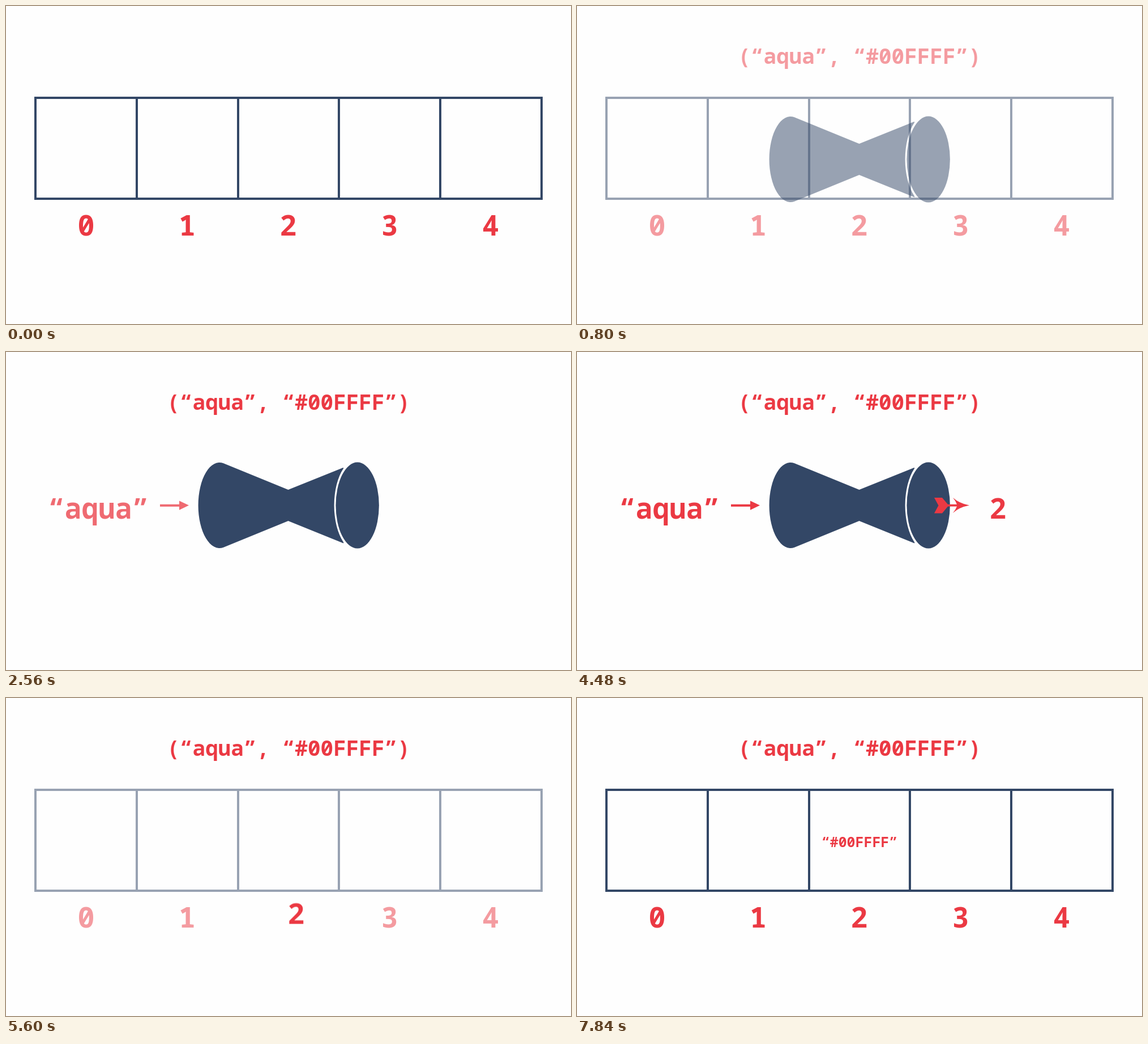
Recreate the animation shown at these times as an HTML page. Size 998 by 561 pixels, loop 8 s.

```html
<!DOCTYPE html>
<html lang="en">
<head>
<meta charset="utf-8">
<title>Hash function and buckets</title>
<style>
  :root { --navy: #334766; --red: #eb3943; }
  html, body { margin: 0; width: 100%; height: 100%; overflow: hidden; background: #fefefe; }
  svg { display: block; width: 100%; height: 100%; }
  text { font: 700 50px "Noto Sans Mono", "DejaVu Sans Mono", monospace; text-anchor: middle; fill: var(--red); }
  .title { font-size: 37.7px; }
  .key { font-size: 49.5px; }
  .value { font-size: 24.9px; }
  .lines { fill: none; stroke: var(--navy); stroke-width: 4; }
  .funnel { fill: var(--navy); }
  .arrow { fill: var(--red); }

  /* Every fade takes four 160 ms ticks. */
  .grid, .title, .funnel, .input, .output, .two, .value {
    animation: 8s steps(4, jump-start) infinite;
  }
  .grid { animation-name: grid; }
  .title { animation-name: title; }
  .funnel { animation-name: funnel; }
  .input { animation-name: input; }
  .output { animation-name: output; }
  .value { animation-name: value; }
  .two {
    animation-name: two, travel;
    animation-timing-function: steps(4, jump-start), step-end;
  }

  @keyframes grid { 0%, 8% { opacity: 1 } 16%, 68% { opacity: 0 } 76%, 100% { opacity: 1 } }
  @keyframes title { 0%, 8% { opacity: 0 } 16%, 100% { opacity: 1 } }
  @keyframes funnel { 0%, 8% { opacity: 0 } 16%, 64% { opacity: 1 } 72%, 100% { opacity: 0 } }
  @keyframes input { 0%, 28% { opacity: 0 } 36%, 64% { opacity: 1 } 72%, 100% { opacity: 0 } }
  @keyframes output { 0%, 50% { opacity: 0 } 58%, 64% { opacity: 1 } 72%, 100% { opacity: 0 } }
  @keyframes value { 0%, 80% { opacity: 0 } 88%, 100% { opacity: 1 } }
  @keyframes two { 0%, 8% { opacity: 1 } 16%, 50% { opacity: 0 } 58%, 100% { opacity: 1 } }
  @keyframes travel {
    0% { transform: translate(0, 0) }
    40% { transform: translate(245px, -111px) }
    64% { transform: translate(231px, -104.5px) }
    66% { transform: translate(167px, -75.5px) }
    68% { transform: translate(78px, -35.5px) }
    70% { transform: translate(14px, -6.5px) }
    72%, 100% { transform: translate(0, 0) }
  }
</style>
</head>
<body>
<svg viewBox="0 0 998 561">
  <g class="grid">
    <path class="lines" d="M52 162H946V340H52ZM231 162V340M410 162V340M588 162V340M767 162V340"/>
    <text x="141.5" y="405">0</text>
    <text x="320" y="405">1</text>
    <text x="677.5" y="405">3</text>
    <text x="856" y="405">4</text>
  </g>

  <g class="funnel">
    <path d="M384 196.3L498.5 243L595 204.2Q597 204 596 205.5A42 82 0 0 0 596 335.5Q597 338 595 337L498.5 298L384 344.7A37.5 75.5 0 1 1 384 196.3Z"/>
    <ellipse cx="620.7" cy="270.6" rx="38.2" ry="76"/>
  </g>

  <g class="input">
    <text class="key" x="163" y="294">“aqua”</text>
    <path class="arrow" d="M272 268.7H306V262.5L323 270.6L306 278.7V272.7H272Z"/>
  </g>

  <g class="output arrow">
    <path d="M631 257H645L655 268.8H671Q669 263 664 257Q675 267 693 270.6Q675 274 664 284Q669 278 671 272.6H655L645 284.5H631L638.5 270.7Z"/>
  </g>

  <text class="two" x="498.5" y="405">2</text>
  <text class="title" x="499" y="102">(“aqua”, “#00FFFF”)</text>
  <text class="value" x="499" y="263">“#00FFFF”</text>
</svg>
</body>
</html>
```
